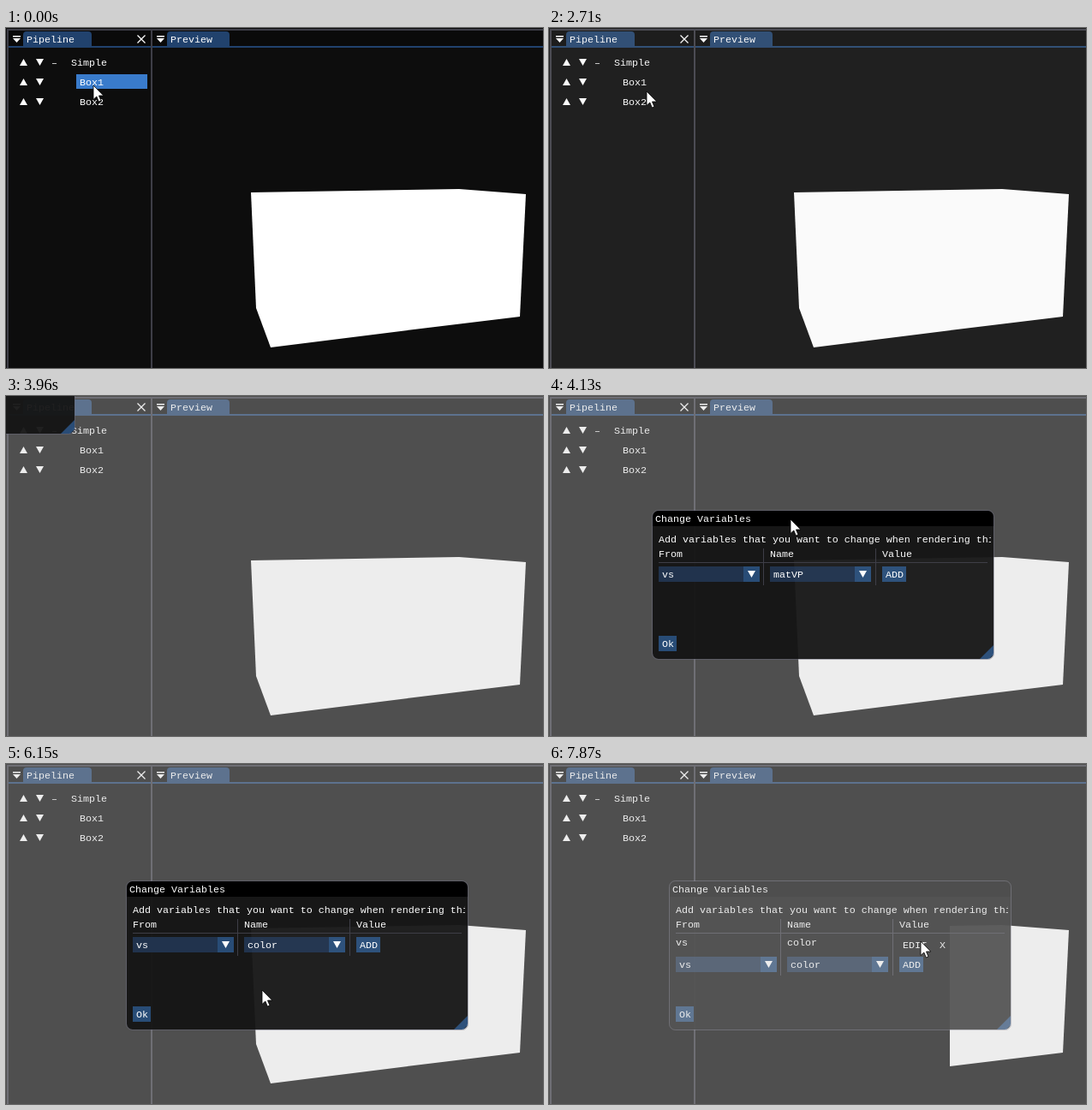
An HTML page with a canvas for the animation above (8 s loop, 627 px wide and 397 px high).

```html
<!DOCTYPE html>
<html lang="en">
<head>
<meta charset="utf-8">
<title>Change Variables</title>
<style>
html, body { margin: 0; width: 627px; height: 397px; overflow: hidden; background: #0d0d0d; }
canvas { display: block; }
</style>
</head>
<body>
<canvas id="stage" width="627" height="397"></canvas>
<script>
const W = 627, H = 397, LOOP = 8000;
const ctx = document.getElementById('stage').getContext('2d');

// Moments when a click takes effect
const MENU = 820, MODAL = 2665, LEFT = 3270, GRAB = 3900, DROP = 4720;
const OPEN = 5220, PICK = 6130, ADDED = 6940, EDIT = 7860;

const BG = '#0d0d0d', LINE = '#3e3e47', TAB = '#21426d';
const POPUP = 'rgba(20,20,20,.94)', EDGE = 'rgba(110,110,128,.5)';
const FRAME = 'rgba(41,74,122,.54)', BUTTON = 'rgba(66,150,250,.42)', HOT = '#4296fa';
const HOVER = '#397bcb', SELECTED = 'rgba(66,150,250,.31)';

// Pointer moves; it rests between them
const moves = [
  { from: 30, to: 310, at: [108, 124] },
  { from: 310, to: 575, at: [96, 58] },
  { from: 960, to: 1430, at: [114, 74] },
  { from: 2920, to: 3030, at: [126, 79] },
  { from: 3130, to: LEFT, at: [52, 69] },
  { from: LEFT, to: GRAB, at: [-259, -180] },
  { from: GRAB, to: 4120, at: [282, 144] },
  { from: 4420, to: DROP, at: [302, 147] },
  { from: DROP, to: 5150, at: [317, 218] },
  { from: 5420, to: 6000, at: [299, 264] },
  { from: 6180, to: 6650, at: [427, 213] },
  { from: 7110, to: 7850, at: [434, 207] }
];

function pointer(t) {
  let [x, y] = [102, 67];
  for (const { from, to, at } of moves) {
    const u = Math.min(1, Math.max(0, (t - from) / (to - from))), k = u * u * (3 - 2 * u);
    x += (at[0] - x) * k;
    y += (at[1] - y) * k;
  }
  return [Math.round(x), Math.round(y)];
}

function rect(x, y, w, h, color) {
  ctx.fillStyle = color;
  ctx.fillRect(x, y, w, h);
}

function poly(color, ...pts) {
  ctx.fillStyle = color;
  ctx.beginPath();
  for (let i = 0; i < pts.length; i += 2) ctx.lineTo(pts[i], pts[i + 1]);
  ctx.closePath();
  ctx.fill();
}

function rounded(x, y, w, h, r, color) {
  ctx.fillStyle = color;
  ctx.beginPath();
  ctx.roundRect(x, y, w, h, r);
  ctx.fill();
}

function text(s, x, middle) {
  ctx.fillStyle = '#fff';
  ctx.fillText(s, x, middle + 4);
}

// dir is 1 for down and -1 for up
const triangle = (x, y, dir) => poly('#fff', x - 4.5, y - 4 * dir, x + 4.5, y - 4 * dir, x, y + 4 * dir);
const inside = ([px, py], x, y, w, h) => px >= x && px < x + w && py >= y && py < y + h;

function popup(x, y, w, h) {
  rect(x, y, w, h, POPUP);
  ctx.strokeStyle = EDGE;
  ctx.strokeRect(x + .5, y + .5, w - 1, h - 1);
}

function tab(x, w, label) {
  rect(x - 12, 9, 9, 1.5, '#fff');
  poly('#fff', x - 12, 12, x - 3, 12, x - 7.5, 17);
  rounded(x, 4, w, 17, [4, 4, 0, 0], TAB);
  text(label, x + 4, 13);
}

function closeMark(x, y, r) {
  ctx.strokeStyle = '#fff';
  ctx.lineWidth = 1.3;
  ctx.beginPath();
  for (const s of [-1, 1]) {
    ctx.moveTo(x - r, y - r * s);
    ctx.lineTo(x + r, y + r * s);
  }
  ctx.stroke();
  ctx.lineWidth = 1;
}

function treeRow(label, x, y) {
  triangle(20.5, y, -1);
  triangle(39.5, y, 1);
  text(label, x, y);
}

function scene(t, mouse) {
  rect(0, 0, W, H, BG);
  rect(3, 3, W, 18, '#0a0a0a');
  poly('#fff', 468, 189, 529, 188, 607, 194, 600, 337, 468, 353);
  if (t < ADDED) poly('#fff', 286, 192, 469, 189, 469, 353, 309, 373, 292, 327);

  rect(2, 21, W, 2, TAB);
  rect(1, 1, W, 2, LINE);
  for (const x of [1, 169]) rect(x, 2, 2, H, LINE);
  tab(20, 80, 'Pipeline');
  tab(188, 73, 'Preview');
  closeMark(158, 13, 4.5);

  text('–', 53, 40);
  treeRow('Simple', 76, 40);
  ['Box1', 'Box2'].forEach((name, i) => {
    const y = 63 + 23 * i;
    if (t < MENU && inside(mouse, 82, y - 9, 83, 17)) rect(82, y - 9, 83, 17, HOVER);
    treeRow(name, 86, y);
  });
}

function contextMenu(mouse) {
  popup(96, 58, 150, 63);
  ['Change Variables', 'Properties', 'Delete'].forEach((name, i) => {
    const y = 64 + 17 * i;
    if (inside(mouse, 100, y, 142, 17)) rect(100, y, 142, 17, HOVER);
    text(name, 104, y + 9);
  });
}

function combo(x, y, label, mouse) {
  const hot = inside(mouse, x, y, 119, 18);
  rect(x, y, 99, 18, hot ? 'rgba(66,150,250,.3)' : FRAME);
  rect(x + 99, y, 19, 18, hot ? HOT : BUTTON);
  triangle(x + 108.5, y + 9, 1);
  text(label, x + 4, y + 9);
}

function button(x, y, label, mouse, base = 'transparent') {
  const w = label.length * 7 + 7;
  rect(x, y, w, 18, inside(mouse, x, y, w, 18) ? HOT : base);
  text(label, x + 4, y + 9);
}

function comboList(x, y, mouse) {
  popup(x, y, 119, 62);
  ['matVP', 'matGeo', 'color'].forEach((name, i) => {
    const top = y + 6 + 17 * i, hot = inside(mouse, x, top - 1, 119, 17);
    if (hot || i === 0) rect(x + 2, top, 116, 16, hot ? HOVER : SELECTED);
    text(name, x + 4, top + 8);
  });
}

function dialog(t, x, y, mouse) {
  const w = 398, h = 173, added = t >= ADDED;
  rounded(x, y, w, h, 7, POPUP);
  rounded(x, y, w, 18, [7, 7, 0, 0], t < EDIT ? '#000' : '#0a0a0a');
  poly(BUTTON, x + w, y + h - 16, x + w, y + h - 5, x + w - 5, y + h, x + w - 16, y + h);
  ctx.strokeStyle = EDGE;
  ctx.beginPath();
  ctx.roundRect(x - .5, y - .5, w + 1, h + 1, 7);
  ctx.stroke();

  text('Change Variables', x + 3, y + 9);
  ctx.save();
  ctx.beginPath();
  ctx.rect(x, y, w - 3, h);
  ctx.clip();
  text('Add variables that you want to change when rendering this item', x + 7, y + 33);
  ctx.restore();

  const cols = [x + 7, x + 137, x + 268];
  ['From', 'Name', 'Value'].forEach((s, i) => text(s, cols[i], y + 50));
  rect(x + 7, y + 60, 384, 1, LINE);
  for (const c of cols.slice(1)) rect(c - 8, y + 44, 1, added ? 66 : 43, LINE);

  if (added) {
    text('vs', cols[0], y + 71);
    text('color', cols[1], y + 71);
    button(cols[2], y + 65, 'EDIT', mouse);
    button(cols[2] + 43, y + 65, 'X', mouse);
  }
  const row = y + (added ? 88 : 65);
  combo(cols[0], row, 'vs', mouse);
  combo(cols[1], row, t < PICK ? 'matVP' : 'color', mouse);
  button(cols[2], row, 'ADD', mouse, BUTTON);
  button(cols[0], y + 146, 'Ok', mouse, BUTTON);
  if (t >= OPEN && t < PICK) comboList(cols[1], y + 84, mouse);
}

function dim(t) {
  const a = .35 * Math.min(1, Math.max(0, (t - MODAL) / 167));
  rect(0, 0, W, H, `rgba(204,204,204,${a})`);
}

function arrow([x, y]) {
  ctx.save();
  ctx.translate(x, y);
  poly('#fff', 0, 0, 0, 16.5, 3.8, 13, 6.3, 19, 9, 18, 6.5, 12, 11.8, 12);
  ctx.strokeStyle = '#000';
  ctx.lineWidth = .8;
  ctx.stroke();
  ctx.restore();
}

function draw(t) {
  const mouse = pointer(t);
  ctx.font = '11.667px "Liberation Mono", monospace';
  ctx.lineWidth = 1;
  scene(t, mouse);
  if (t >= MENU && t < MODAL) contextMenu(mouse);
  if (t < EDIT) dim(t);
  if (t >= GRAB) {
    // The title bar follows the pointer until it is let go
    const [x, y] = pointer(Math.min(t, DROP));
    dialog(t, x - 161, y - 10, t < EDIT ? mouse : [-1, -1]);
  }
  if (t >= EDIT) dim(t);
  if (t < LEFT || t >= GRAB) arrow(mouse);
}

function tick() {
  draw(performance.now() % LOOP);
  requestAnimationFrame(tick);
}
tick();
</script>
</body>
</html>
```
